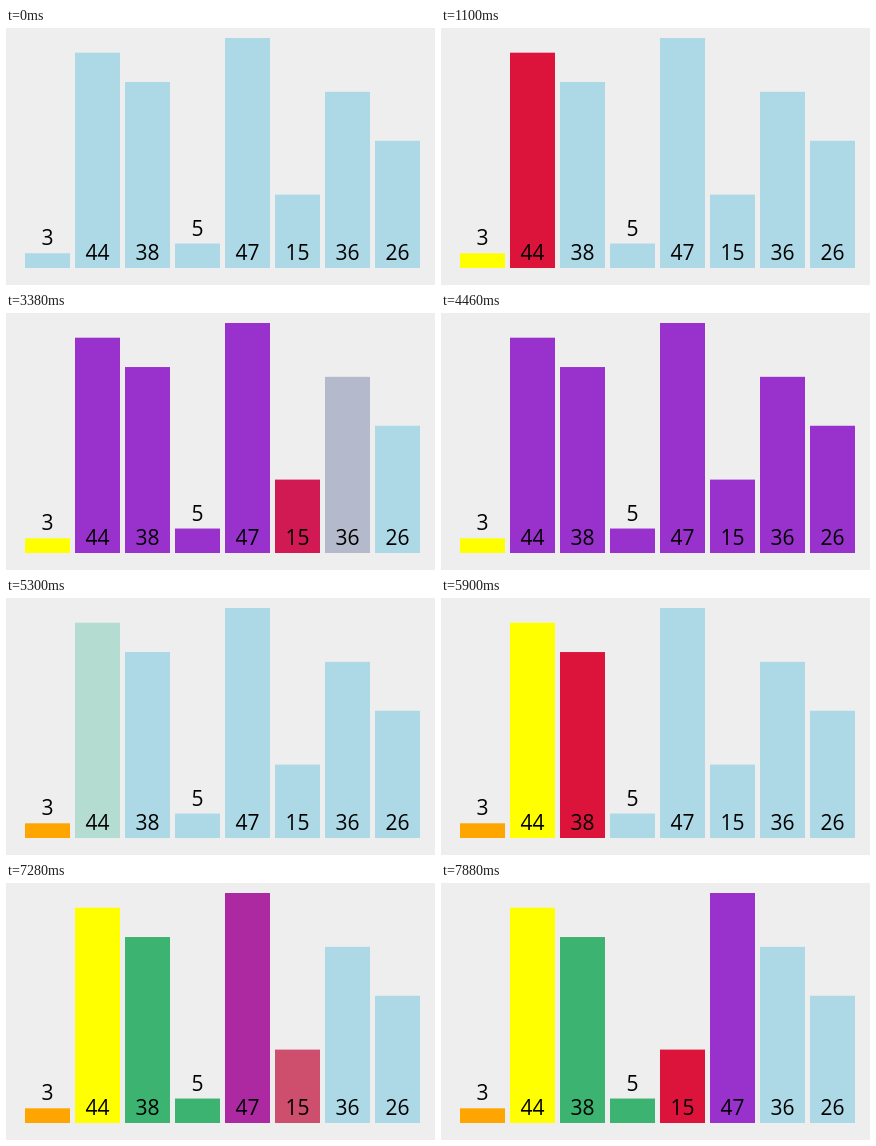
An HTML page with a canvas that plays this animation: 429 px wide and 257 px high, repeating every 8 s.

```html
<!DOCTYPE html>
<html lang="en">
<head>
<meta charset="utf-8">
<title>Quicksort partition</title>
<style>
  html, body { margin: 0; width: 100%; height: 100%; overflow: hidden; background: #eee; }
  canvas { display: block; }
</style>
</head>
<body>
<canvas id="stage" width="429" height="257"></canvas>
<script>
const ctx = document.getElementById('stage').getContext('2d');

const LOOP = 8000, TICK = 30, TICK_OFFSET = 20;
const FIRST_STEP = 415, STEP = 480, FADE = 250;
const LEFT = 19, PITCH = 50, WIDTH = 45, BASE = 240, UNIT = 230 / 47;

const IDLE = [173, 216, 230], PIVOT = [255, 255, 0], CURRENT = [220, 20, 60];
const SMALLER = [60, 179, 113], LARGER = [153, 50, 204], SORTED = [255, 165, 0];

const values = [3, 44, 38, 5, 47, 15, 36, 26];
const steps = [];

// Each step records the bars it recolours, and optionally a pair to swap.
const paint = (colors, lag = 0) => steps.push({ colors, lag });
const verdict = (i, pivot) => values[i] < values[pivot] ? SMALLER : LARGER;

function scan(pivot, last) {
  for (let i = pivot + 1; i <= last; i++) {
    const colors = { [i]: CURRENT };
    if (i - 1 > pivot) colors[i - 1] = verdict(i - 1, pivot);
    paint(colors);
  }
}

paint({ 0: PIVOT });
scan(0, 7);
paint({ 7: verdict(7, 0) });
paint(Object.fromEntries(values.map((v, i) => [i, i ? IDLE : SORTED])));
paint({ 1: PIVOT }, 14);
scan(1, 5);
steps.push({ colors: {}, lag: 0, swap: [4, 5] });

const mix = (a, b, k) => a + (b - a) * k;

function easeInOut(t) {
  t = Math.min(1, Math.max(0, t));
  return t < 0.5 ? 4 * t ** 3 : 1 - 4 * (1 - t) ** 3;
}

// Barely visible tints are snapped to the nearest end of the fade.
const snap = k => k < 0.08 ? 0 : k > 0.94 ? 1 : k;

function barsAt(time) {
  const bars = values.map((value, i) => ({ value, slot: i, color: IDLE }));
  steps.forEach(({ colors, lag, swap }, n) => {
    const k = easeInOut((time - FIRST_STEP - n * STEP - lag) / FADE);
    const tint = snap(k);
    for (const i in colors) {
      bars[i].color = bars[i].color.map((c, j) => mix(c, colors[i][j], tint));
    }
    if (swap && k > 0.01) {
      const [a, b] = swap;
      bars[a].slot = mix(a, b, k);
      bars[b].slot = mix(b, a, k);
    }
  });
  return bars;
}

function drawBar({ value, slot, color }) {
  const x = LEFT + slot * PITCH, height = value * UNIT, top = BASE - height;
  ctx.fillStyle = `rgb(${color.map(Math.round).join(',')})`;
  ctx.fillRect(x, top, WIDTH, height);
  ctx.fillStyle = '#000';
  ctx.fillText(value, x + WIDTH / 2, height < 30 ? top - 8 : BASE - 8);
}

function frame(now) {
  const time = Math.floor((now % LOOP - TICK_OFFSET) / TICK) * TICK + TICK_OFFSET;
  ctx.fillStyle = '#eee';
  ctx.fillRect(0, 0, 429, 257);
  ctx.font = '21px "Open Sans", "Noto Sans", sans-serif';
  ctx.textAlign = 'center';
  barsAt(time).forEach(drawBar);
  requestAnimationFrame(frame);
}

frame(performance.now());
</script>
</body>
</html>
```
